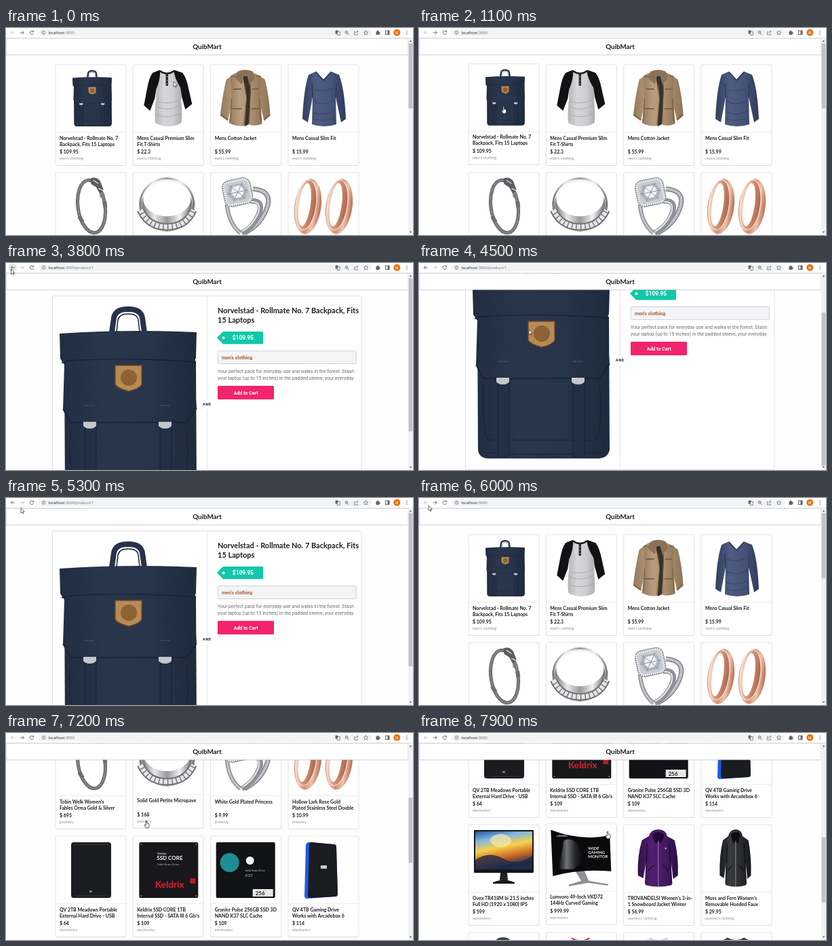
Recreate the animation shown at these times as an HTML page. Size 600 by 305 pixels, loop 8000 ms.

```html
<!DOCTYPE html>
<html lang="en">
<head>
<meta charset="utf-8">
<title>Shop demo</title>
<style>
  html, body { margin: 0; width: 100%; height: 100%; overflow: hidden; background: #fff; }
  svg { display: block; width: 100vw; height: 100vh; }
  text { font-family: Lato, sans-serif; fill: #1b1c1d; }
  .bold { font-weight: 700; }
  .ui { font-family: Roboto, sans-serif; }
  .url { font-family: "Open Sans", sans-serif; }
  .mid { text-anchor: middle; }
</style>
</head>
<body>
<svg id="stage" viewBox="0 0 600 305" xmlns="http://www.w3.org/2000/svg"></svg>
<script>
const LOOP = 8000;
const COLS = [73, 187.3, 301.7, 416], TOP = 54, PITCH = 159, CARD_W = 104, CARD_H = 148.5;
const SHOP_H = 834, PRODUCT_H = 355;

const rect = (x, y, w, h, fill, more = '') =>
  `<rect x="${x}" y="${y}" width="${w}" height="${h}" fill="${fill}" ${more}/>`;
const path = (d, fill, more = '') => `<path d="${d}" fill="${fill}" ${more}/>`;
const line = (d, color, width = 1, more = '') =>
  `<path d="${d}" fill="none" stroke="${color}" stroke-width="${width}" ${more}/>`;
const dot = (x, y, r, fill, more = '') => `<circle cx="${x}" cy="${y}" r="${r}" fill="${fill}" ${more}/>`;
const oval = (x, y, rx, ry, fill, more = '') =>
  `<ellipse cx="${x}" cy="${y}" rx="${rx}" ry="${ry}" fill="${fill}" ${more}/>`;
const ring = (x, y, rx, ry, color, width, more = '') =>
  oval(x, y, rx, ry, 'none', `stroke="${color}" stroke-width="${width}" ${more}`);
const text = (x, y, size, str, cls = '', fill = '#1b1c1d') =>
  `<text x="${x}" y="${y}" font-size="${size}" class="${cls}" style="fill:${fill}">${str}</text>`;
const group = (inner, more = '') => `<g ${more}>${inner}</g>`;
const gradient = (id, stops, dir = 'x2="1" y2="0"') =>
  `<linearGradient id="${id}" ${dir}>${stops.map((c, i) =>
    `<stop offset="${i / (stops.length - 1)}" stop-color="${c}"/>`).join('')}</linearGradient>`;

const defs = `<defs>
  ${gradient('navy', ['#222d42', '#29364c', '#273449', '#1f2a3e'])}
  ${gradient('cotton', ['#b4b4b7', '#d6d6d8', '#cfcfd2', '#adadb1'])}
  ${gradient('khaki', ['#94795c', '#b89d7e', '#ab9070', '#8f7557'])}
  ${gradient('denim', ['#333f60', '#4f5c81', '#465276', '#303c5e'])}
  ${gradient('silver', ['#77777a', '#e9e9ea', '#98989b', '#f1f1f1', '#6f6f73'])}
  ${gradient('rose', ['#c98468', '#f3cbb6', '#d39072', '#f0c3ac', '#b56d52'])}
  ${gradient('roseInside', ['#f7ddd0', '#d59678', '#a9654b'])}
  ${gradient('plum', ['#32104c', '#50206f', '#431a62', '#2d0d45'])}
  ${gradient('leather', ['#1a1b1d', '#3a3b3f', '#2a2b2e', '#18191b'])}
  ${gradient('sunset', ['#2453a4', '#7fb6e0', '#f4d24b', '#cf6a25', '#24304f'], 'x2="0.3" y2="1"')}
  ${gradient('robot', ['#08080a', '#6f7377', '#26282b', '#050506'])}
</defs>`;

// Drawn at product-page size, 202 x 289
const backpack =
  line('M77 38L80 17Q82 4 101 4Q120 4 122 17L125 38', '#26334a', 8) +
  line('M84 37L86 20Q88 11 101 11Q115 11 116 20L118 37', '#141f33', 1.5) +
  path('M7 80L201 80L202 276Q200 288 186 289H22Q9 288 8 276Z', 'url(#navy)') +
  path('M0 40Q100 33 202 38L201 76L197 86L202 150L187 171H16L5 151L7 86L1 77Z', 'url(#navy)') +
  line('M3 83L14 80Q100 74 199 82M5 151L16 171H187L202 150', '#172236', 1.6) +
  line('M16 181Q14 240 22 262H182Q192 240 187 180M12 280Q100 286 194 280', '#18243a', 1.2) +
  [37, 148].map(x => rect(x, 171, 17, 115, '#222f46', 'stroke="#142036"') +
    path(`M${x - 2} 170h19v6q-3 4 -9.5 4t-9.5 -4z`, '#c6c7ca') +
    line(`M${x} 146h14`, '#5a6474', 1, 'stroke-dasharray="2 1"')).join('') +
  path('M82 87H121V115Q118 121 102 125Q86 121 82 115Z', '#b98a54', 'stroke="#6f4c2b" stroke-width="1.4"') +
  dot(102, 105, 12, '#8d6236');

const raglan =
  path('M37 9Q50 16 62 9L72 30 71 55Q73 78 71 86Q52 96 33 86Q31 72 34 50L33 30Z', 'url(#cotton)') +
  path('M39 8L29 12Q24 18 21 34L16 60 25 68 32 50 34 36Q40 24 40 9Z', '#121214') +
  path('M61 8L73 12Q79 20 82 36L87 58 77 66 72 48 70 34Q62 22 60 9Z', '#121214') +
  line('M39 9Q50 17 61 9', '#19191c', 2.4) + line('M50 13V31', '#242427', 3.4) +
  [18, 23, 28].map(y => dot(50, y, .7, '#ddd')).join('') +
  line('M36 54Q48 60 69 52M35 62Q50 70 70 60M35 74Q52 80 70 72', '#a6a6aa', .9);

const jacket =
  path('M30 17L23 22Q18 42 14 75L25 83 32 55ZM73 17L80 22Q86 45 88 75L79 83 72 55Z', 'url(#khaki)') +
  path('M37 12L29 17 31 50 27 86Q40 92 50 90L55 88Q65 92 76 87L73 50 74 17 63 12Z', 'url(#khaki)') +
  path('M47 15L56 15 59 40 56 88 50 91 53 50Z', '#37312b') +
  path('M40 10Q51 5 62 10L66 20 57 29 54 17 49 17 46 29 35 19Z', '#8b7156') +
  line('M51 28L53 50 49 89M59 28L57 86M31 50L29 84M72 50L74 85', '#6f583f', 1) +
  line('M33 36H45M61 36H71M31 65H45M60 65H73M30 17H35M68 17H73', '#7b6348', 1.8) +
  line('M15 74L26 81M87 74L78 81', '#6f583f', 1.2);

const sweater =
  path('M41 10L30 15Q23 35 21 80L29 85 36 48 35 88Q53 94 71 88L70 48 78 85 85 80Q83 35 75 15L63 10 52 22Z', 'url(#denim)') +
  line('M41 11L52 23 63 11', '#2b3658', 1.8) +
  line('M36 48L35 28M70 48L71 28', '#2e3959', 1.4) +
  line('M37 54Q52 62 69 52M37 70Q54 77 69 67M38 36Q52 42 67 34M37 80Q52 85 69 78', '#38456a', 1.1);

const bracelet = group(
  ring(53, 50, 20, 39, '#4c4d51', 5) + ring(53, 50, 20, 39, '#a9aaad', 3.6, 'stroke-dasharray="1.2 1"') +
  path('M57 9Q66 6 71 15L74 28 68 34 64 23 57 17Z', '#5c5d61') +
  line('M61 12L68 18M67 25L73 29', '#dcdcdf', 1.4) + ring(71, 36, 3, 4, '#88898d', 1.6) +
  line('M73 45L73 54M33 62L37 71', '#6d6e72', 6), 'transform="rotate(-8 53 50)"');

const band =
  oval(50, 47, 41, 40, 'url(#silver)') +
  oval(50, 44, 37.5, 34, '#f4f4f5') + oval(50, 46, 37, 30, 'url(#silver)') +
  oval(50, 39, 35, 25.5, '#fff') +
  line('M11 55Q22 80 50 80Q78 80 89 55', '#737377', 11) +
  line('M11 55Q22 80 50 80Q78 80 89 55', '#e6e6e9', 7, 'stroke-dasharray="5 1.4"');

const halo =
  line('M62 24Q90 26 84 49Q76 76 50 89', '#7d7f85', 7) +
  line('M62 24Q90 26 84 49Q76 76 50 89', '#e1e2e6', 4, 'stroke-dasharray="1.6 .8"') +
  line('M58 42Q78 40 72 59Q64 80 46 89', '#8f9197', 8) +
  line('M59 43Q76 42 70 60Q62 78 46 87', '#e6e7ea', 2) +
  line('M24 47Q27 76 44 89', '#8a8c92', 6) + line('M24 47Q27 76 44 89', '#dedfe3', 3, 'stroke-dasharray="1.6 .8"') +
  group(rect(18, 9, 43, 40, '#85878d', 'rx="11"') +
    rect(20.5, 11.5, 38, 35, '#c9ccd2', 'rx="8" stroke="#f0f0f3" stroke-width="3" stroke-dasharray="2 1"') +
    path('M30 17H49L55 29 49 41H31L24 29Z', '#aeb4be') +
    path('M34 20H46L50 29 44 37H35L30 29Z', '#f1f3f6') +
    line('M30 17L40 29 49 17M24 29H55M31 41L40 29 49 41', '#7f8590', .8), 'transform="rotate(-12 39 29)"');

const hoops = [29, 75].map(x => group(
  oval(x, 50, 19.5, 41, 'url(#rose)') +
  oval(x - 3, 48, 15, 37, 'url(#roseInside)', 'stroke="#f8e3d8" stroke-width="1.2"') +
  oval(x - 5, 48, 8.5, 32, '#fff'), `transform="rotate(8 ${x} 50)"`)).join('');

const drive = rect(23, 9, 59, 82, '#1b1c20', 'rx="4"') + line('M26 12H79M31 88H75', '#36383d', 1) +
  rect(50, 80, 4, 3, '#77797e');

const ssd = rect(9, 9, 87, 82, '#18181b', 'rx="2"') +
  [[12, 12], [93, 12], [12, 88], [93, 88]].map(([x, y]) => dot(x, y, 1.1, '#777')).join('') +
  text(36, 27, 4.2, 'Keldrix', 'bold', '#ddd') +
  text(35, 35, 8, 'SSD CORE', 'bold', '#fff') + text(36, 43, 4.4, 'Solid State Drive', '', '#bbb') +
  text(54, 76, 13.5, 'Keldrix', 'bold mid', '#e0202a') + rect(84, 62, 8, 8, '#b01b22');

const ssdTeal = rect(8, 9, 87, 82, '#111316', 'rx="2"') +
  dot(28, 39, 14, '#1d8f92') + dot(58, 36, 6, '#f2f2f2') +
  text(51, 52, 4, 'Solid State Drive', '', '#ccc') + text(51, 60, 6, 'K37', 'bold', '#4ea9ab') +
  rect(62, 78, 30, 11, '#e7e7e7') + text(66, 87, 8, '256', 'bold');

const driveBlue = path('M26 13Q27 9 31 9L67 12Q71 12 71 16L73 85Q73 89 69 89L28 92Q24 92 24 88Z', '#1d5be0') +
  path('M31 12Q31 9 35 9L67 12Q71 12 71 16L73 85Q73 89 69 89L33 91Q29 91 29 87Z', '#1b1c1f') +
  rect(48, 43, 9, 5, '#c9cbd0');

const monitor = rect(8, 8, 88, 63, '#15161a', 'rx="1"') + rect(10, 10, 84, 56, 'url(#sunset)') +
  path('M10 52Q30 38 51 50T94 46V66H10Z', '#1d2a46', 'opacity=".8"') +
  path('M36 17Q49 10 60 18Q68 25 57 31Q42 36 34 28Q29 21 36 17Z', '#f6e8a6', 'opacity=".75"') +
  path('M47 71H57L58 82H46Z', '#222') + path('M36 85Q52 78 68 85V87H36Z', '#17181b');

const curved = path('M42 68L55 66 63 84 92 89 91 91 62 87 34 92 33 90 52 84Z', '#8d8f94') +
  path('M7 9Q52 26 94 17L96 70Q50 66 10 77Z', '#0b0b0d') +
  path('M26 25Q37 18 48 32L55 57 40 67H18L23 43Z', 'url(#robot)') +
  text(16, 19, 3, 'LUMVORO', 'bold', '#ddd') +
  ['WIDE', 'GAMING', 'MONITOR'].map((s, i) => text(62, 38 + i * 6.3, 6, s, 'bold', '#f0f0f0')).join('');

const hooded = (fill, dark, zip) =>
  path('M37 17Q40 7 51 7Q62 7 64 17L75 23Q81 46 80 75L73 80 70 55 71 89Q51 94 32 89L33 55 29 79 21 75Q20 45 27 23Z', fill) +
  path('M42 15Q51 7 60 15L56 27H46Z', dark) + line('M51 24V91', zip, 1.4) +
  line('M35 28L32 87M67 28L71 87M36 68L44 60M66 68L58 60', dark, 1.4);
const parka = hooded('url(#plum)', '#230936', '#86649b') + dot(62, 35, 1.4, '#a78bb8');
const leather = group(hooded('url(#leather)', '#0d0e0f', '#85878b'), 'transform="translate(11 0) scale(.78 1)"');

const tee = (fill, trim) =>
  path('M38 8Q51 14 64 8L78 15 86 36 74 40V90H29V40L17 36 25 15Z', fill) + line('M38 8Q51 17 64 8', trim, 2);

const MEN = 'men\'s clothing', GEMS = 'jewelery', TECH = 'electronics', WOMEN = 'women\'s clothing';
const products = [
  ['Norvelstad - Rollmate No. 7', 'Backpack, Fits 15 Laptops', '109.95', MEN, group(backpack, 'transform="translate(25 8) scale(.287)"')],
  ['Mens Casual Premium Slim', 'Fit T-Shirts', '22.3', MEN, raglan],
  ['Mens Cotton Jacket', '', '55.99', MEN, jacket],
  ['Mens Casual Slim Fit', '', '15.99', MEN, sweater],
  ['Tobin Welk Women\'s', 'Fables Orma Gold &amp; Silver', '695', GEMS, bracelet],
  ['Solid Gold Petite Micropave', '', '168', GEMS, band],
  ['White Gold Plated Princess', '', '9.99', GEMS, halo],
  ['Hollow Lark Rose Gold', 'Plated Stainless Steel Double', '10.99', GEMS, hoops],
  ['QV 2TB Meadows Portable', 'External Hard Drive - USB', '64', TECH, drive],
  ['Keldrix SSD CORE 1TB', 'Internal SSD - SATA III 6 Gb/s', '109', TECH, ssd],
  ['Granite Pulse 256GB SSD 3D', 'NAND K37 SLC Cache', '109', TECH, ssdTeal],
  ['QV 4TB Gaming Drive', 'Works with Arcadebox 6', '114', TECH, driveBlue],
  ['Ovex TR418M bi 21.5 inches', 'Full HD (1920 x 1080) IPS', '599', TECH, monitor],
  ['Lumvoro 49-Inch VKD72', '144Hz Curved Gaming', '999.99', TECH, curved],
  ['TROVANDELSI Women\'s 3-in-', '1 Snowboard Jacket Winter', '56.99', WOMEN, parka],
  ['Moss and Fern Women\'s', 'Removable Hooded Faux', '29.95', WOMEN, leather],
  ['Rain Jacket Women', 'Windbreaker Striped', '39.99', WOMEN, hooded('#3a4358', '#232a3a', '#888')],
  ['Women\'s Solid Short', 'Sleeve Boat Neck', '9.85', WOMEN, tee('#f0e6e8', '#c33a55')],
  ['Women\'s Short Sleeve', 'Moisture', '7.95', WOMEN, tee('#ececee', '#c9c9cc')],
  ['Womens T Shirt Casual', 'Cotton Short', '12.99', WOMEN, tee('#6b3d74', '#4d2857')]
];

const cardPos = i => [COLS[i % 4], TOP + PITCH * Math.floor(i / 4)];
const card = ([title, rest, price, kind, art], i) => group(
  rect(0, .5, CARD_W, CARD_H, '#d8d8dc', 'rx="2"') +
  rect(0, 0, CARD_W, CARD_H, '#fff', 'rx="2" stroke="#d8d8db" stroke-width=".7"') + art +
  line(`M0 99.5H${CARD_W}`, '#e6e6e8', .7) +
  text(6, 110.6, 7.03, title, 'bold') + text(6, 119.7, 7.03, rest, 'bold') +
  text(6, 131.2, 7.03, '$ ' + price, 'bold') + text(6, 140.3, 5.6, kind, '', '#8f8f8f'), `id="card${i}"`);

const productPage =
  rect(68.5, 48.5, 455.5, 320.5, '#fff', 'rx="1.5" stroke="#d8d8da" stroke-width=".8"') +
  group(backpack, 'transform="translate(79 64)"') +
  line('M296.5 49V202M296.5 215V369', '#dedee0', .8) +
  text(296.3, 210.4, 5.4, 'AND', 'ui bold mid').replace('<text', '<text letter-spacing=".6"') +
  text(312, 73.8, 11, 'Norvelstad - Rollmate No. 7 Backpack, Fits', 'bold') +
  text(312, 87.8, 11, '15 Laptops', 'bold') +
  path('M311 110L320 101H377.5Q379 101 379 102.5V118Q379 119.5 377.5 119.5H320Z', '#12c7a9') +
  dot(320.5, 110.2, 2, '#fff') + text(349.5, 113.2, 8.4, '$109.95', 'ui bold mid', '#fff') +
  rect(312.3, 129.5, 204, 19, '#f3f4f5', 'rx="1.5" stroke="#c9cacc" stroke-width=".8"') +
  text(318, 141.5, 7.03, MEN, 'ui bold', '#a8623f') +
  text(312, 161.8, 7.03, 'Your perfect pack for everyday use and walks in the forest. Stash', 'ui', '#6b6b6b') +
  text(312, 171.9, 7.03, 'your laptop (up to 15 inches) in the padded sleeve, your everyday', 'ui', '#6b6b6b') +
  rect(312, 181, 83, 20, '#f1246c', 'id="buy" rx="1.6"') +
  text(353.6, 193.5, 7.03, 'Add to Cart', 'ui bold mid', '#fff');

const GREY = '#5f6368';
const toolbar =
  rect(0, 0, 600, 15, '#fff') + rect(48, 1.2, 491, 11.4, '#f1f3f4', 'rx="5.7"') +
  dot(9.8, 6.8, 6, '#e2e3e5', 'id="halo"') +
  line('M12.8 6.8H7.2M9.8 4.2L7.2 6.8L9.8 9.4', GREY, .9, 'id="back"') +
  line('M20.8 6.8H26.4M23.8 4.2L26.4 6.8L23.8 9.4', GREY, .9, 'id="forward"') +
  line('M40.2 5.2A2.7 2.7 0 1 0 40.6 7.6M40.7 3.8V5.8H38.7', GREY, .9) +
  ring(55.5, 6.8, 2.5, 2.5, GREY, .7) + line('M55.5 6.4V8.3M55.5 5.2V5.8', GREY, .7) +
  `<text x="62.5" y="9" font-size="5.7" class="url">localhost<tspan fill="#6b6f74">:3000<tspan id="route"></tspan></tspan></text>` +
  rect(485.6, 3.6, 4, 5, GREY) + rect(488.4, 5.4, 3.8, 5, '#f1f3f4', `stroke="${GREY}" stroke-width=".7"`) +
  line('M503.4 8L505.4 10', GREY, .9) + ring(502, 6.3, 1.9, 1.9, GREY, .8) + line('M501 6.3H503', GREY, .6) +
  line('M515 5.5H513.5V10H518.5V8M515.5 8Q516 5 519 5M517.5 3.5L519 5L517.5 6.5', GREY, .7) +
  line('M530.5 3.6L531.5 5.8 533.8 6 532 7.6 532.6 9.9 530.5 8.7 528.4 9.9 529 7.6 527.2 6 529.5 5.8Z', GREY, .7) +
  rect(545.5, 5, 5, 5, GREY, 'rx=".6"') + dot(548, 4.7, 1.1, GREY) + dot(550.6, 7.4, 1.1, GREY) +
  rect(559.5, 4, 5.5, 5.5, 'none', `stroke="${GREY}"`) + rect(562.5, 4, 2.5, 5.5, GREY) +
  dot(576.3, 6.7, 5, '#e8710a') + text(576.3, 8.6, 5, 'M', 'ui mid', '#fff') +
  [4.4, 6.8, 9.2].map(y => dot(591, y, .7, GREY)).join('') +
  line('M0 14.7H600', '#d9dadc', .8);

const header = rect(0, 38, 593, 3, '#000', 'opacity=".05"') +
  rect(.4, 15.4, 592.4, 23.8, '#fff', 'stroke="#d6d6d8" stroke-width=".8"') +
  text(296.5, 31, 9.8, 'QuibMart', 'bold mid');

const scrollbar = rect(593, 15, 7, 290, '#f1f1f1') +
  path('M594.8 20.3H598.2L596.5 18Z', '#505050') + path('M594.8 299.8H598.2L596.5 302Z', '#505050') +
  rect(593.6, 22, 5.8, 96, '#c1c1c1', 'id="thumb"');

const arrow = path('M0 0V7.6L1.8 6 3 8.6 4.2 8 3 5.5H5.4Z', '#fff', 'id="arrow" stroke="#111" stroke-width=".6"');
const hand = path('M-.8 .6Q0 -.6 .8 .6V4L4 5V8Q3.6 10 3 10.8H-1L-3.2 6.6Q-3 5.4 -.8 7Z', '#fff', 'id="hand" stroke="#111" stroke-width=".7"');

const stage = document.getElementById('stage');
stage.innerHTML = defs + rect(0, 0, 600, 305, '#fefdff') +
  group(products.map(card).join(''), 'id="shop"') + group(productPage, 'id="product"') +
  header + scrollbar + toolbar + group(arrow + hand, 'id="pointer"');

const $ = id => document.getElementById(id);
const set = (id, name, value) => $(id).setAttribute(name, value);
const show = (id, on) => set(id, 'visibility', on ? 'visible' : 'hidden');

const pointerKeys = [
  [0, 247, 79], [200, 247, 79], [900, 125, 115], [1900, 122, 117], [2550, 122, 117],
  [3050, 345, 188], [3200, 345, 188], [3650, 7.5, 9], [3850, 7.5, 9], [4300, 162, 98],
  [4800, 162, 98], [5400, 11, 8], [5750, 11, 8], [5950, 14, 11], [6050, 14, 11],
  [6350, 150, 92], [6800, 205, 125], [7200, 207, 129], [7400, 212, 131], [7850, 278, 145], [LOOP, 278, 145]
];
const productScroll = [[4000, 0], [4400, 65], [4900, 65], [5250, 0]];
const shopScroll = [[6400, 0], [7150, 220], [7300, 220], [7850, 396]];

const ease = u => u * u * (3 - 2 * u);
function sample(keys, t) {
  if (t <= keys[0][0]) return keys[0].slice(1);
  const i = keys.findIndex(k => k[0] > t);
  if (i < 0) return keys[keys.length - 1].slice(1);
  const [a, b] = [keys[i - 1], keys[i]];
  const u = ease((t - a[0]) / (b[0] - a[0]));
  return a.slice(1).map((v, n) => v + (b[n + 1] - v) * u);
}

function draw(t) {
  const routed = t >= 2100 && t < 5800;
  const onProduct = t >= 2600 && t < 5800;
  const [x, y] = sample(pointerKeys, t);
  const [scroll] = sample(onProduct ? productScroll : shopScroll, t);
  const total = onProduct ? PRODUCT_H : SHOP_H;
  const inPage = y > 40 && t > 200;

  show('shop', !onProduct);
  show('product', onProduct);
  set('shop', 'transform', `translate(0 ${-scroll})`);
  set('product', 'transform', `translate(0 ${-scroll})`);
  set('thumb', 'y', 22.5 + scroll * 276 / total);
  set('thumb', 'height', 290 * 276 / total);

  let hovered = false;
  products.forEach((_, i) => {
    const [cx, cy] = cardPos(i);
    const over = !onProduct && inPage && x > cx && x < cx + CARD_W &&
      y + scroll > cy && y + scroll < cy + CARD_H;
    hovered = hovered || over;
    set('card' + i, 'transform', `translate(${cx} ${cy - (over ? 1.2 : 0)})`);
  });
  const buying = onProduct && x > 312 && x < 395 && y + scroll > 181 && y + scroll < 201;
  set('buy', 'fill', buying ? '#d91a5c' : '#f1246c');

  $('route').textContent = routed ? '/product/1' : '';
  set('back', 'stroke', routed ? GREY : '#c4c6c9');
  set('forward', 'stroke', routed ? '#c4c6c9' : GREY);
  show('halo', routed && x < 16 && y < 14);

  const pointing = buying || (hovered && !routed);
  show('hand', pointing);
  show('arrow', !pointing);
  set('pointer', 'transform', `translate(${x} ${y})`);
}

const start = performance.now();
function tick() {
  draw((performance.now() - start) % LOOP);
  requestAnimationFrame(tick);
}
tick();
</script>
</body>
</html>
```
